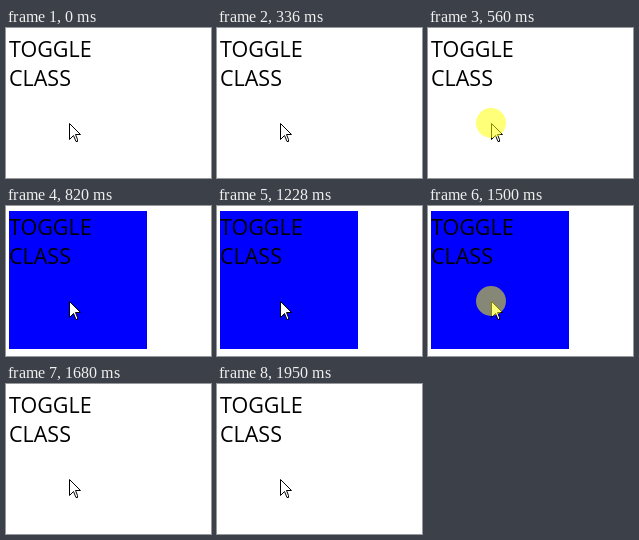
Animation of 205x150 px, one loop 2130 ms. Source, as an HTML page:

```html
<!DOCTYPE html>
<html lang="en">
<head>
<meta charset="utf-8">
<title>Toggle class</title>
<style>
  html, body { margin: 0; width: 100%; height: 100%; overflow: hidden; background: #fff; }
  svg { display: block; }
  text { font: 21.5px "Open Sans", "Noto Sans", sans-serif; }
  .box { fill: none; }
  .box.active { fill: #00f; }
  .press { fill: #ff0; fill-opacity: .53; visibility: hidden; }
  .press.active { visibility: visible; }
</style>
</head>
<body>
<svg width="205" height="150" viewBox="0 0 205 150">
  <rect class="box" x="3" y="5" width="138" height="138"/>
  <text x="3" y="29">TOGGLE</text>
  <text x="3" y="58">CLASS</text>
  <path transform="translate(63 95)" fill="#fff" stroke="#000"
        d="M.5 .5V16.5L4.5 12.5L7 18.5H8.5V16.5L6.5 11.5H11.5Z"/>
  <circle class="press" cx="63" cy="95" r="15"/>
</svg>
<script>
  const LOOP = 2130;
  const box = document.querySelector('.box');
  const press = document.querySelector('.press');
  const within = (t, start, end) => t >= start && t < end;

  function draw() {
    const t = performance.now() % LOOP;
    box.classList.toggle('active', within(t, 820, 1680));
    press.classList.toggle('active', within(t, 560, 820) || within(t, 1500, 1680));
    requestAnimationFrame(draw);
  }
  draw();
</script>
</body>
</html>
```
